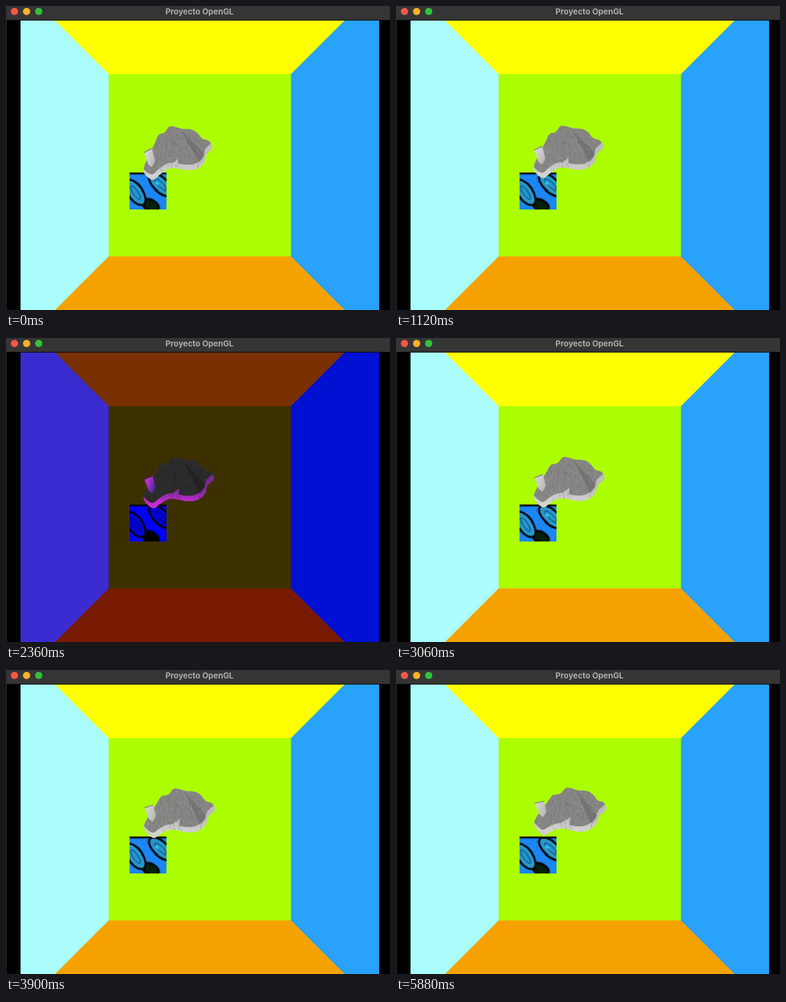
An HTML page with a canvas that plays this animation: 634x502 px, repeating every 5.9 s.

```html
<!DOCTYPE html>
<html lang="es">
<head>
<meta charset="utf-8">
<title>Proyecto OpenGL</title>
<style>
html, body { margin: 0; width: 634px; height: 502px; overflow: hidden; background: #000; }
canvas { display: block; }
</style>
</head>
<body>
<canvas id="stage" width="634" height="502"></canvas>
<script>
const LOOP = 5900, DARK_FROM = 1200, DARK_TO = 2820;
const ctx = document.getElementById('stage').getContext('2d');

const bright = {
  left: '#aafdfb', top: '#ffff00', back: '#acff00', right: '#28a2fa', floor: '#f5a200',
  fur: '#858583', grain: ['#4c4c4c', '#b4b4b2'], shade: 'rgba(40,40,40,0.2)',
  pale: ['#bebebc', '#d2d2d0'], ear: ['#d4d4d2', '#b8b8b6'],
  sky: '#1c86f4', leaf: '#2898cc', vein: '#104f88', glow: '#2fd5e0', moss: '#04210c'
};
const dark = {
  left: '#3a2cd0', top: '#783000', back: '#3c3000', right: '#0010d2', floor: '#781a00',
  fur: '#2b2b2b', grain: ['#101010', '#444444'], shade: 'rgba(0,0,0,0.2)',
  pale: ['#7a2a9c', '#c62cd4'], ear: ['#c82cd8', '#402c90'],
  sky: '#0000ff', leaf: '#0000dc', vein: '#000070', glow: '#0000f0', moss: '#000000'
};

// Key points of the model at the start of the loop
const BODY = [
  [238,243], [246,226], [252,213], [262,209], [270,199], [280,200], [291,203],
  [305,204], [316,210], [324,219], [335,223], [341,234], [331,245], [327,259],
  [315,269], [298,271], [272,268], [256,277], [242,287], [227,272]
];
const EAR = [[228,242], [241,235], [246,255], [241,266], [235,262]];
const NOTCH = [[268,266], [284,252], [284,268]];
const RIDGE = [[288,204], [328,245], [320,260]];

const clamp = v => Math.max(0, Math.min(1, v));

// The model tilts towards the viewer: its top leans right, its low left side rises
function tilt(points, k, lift = 0) {
  return points.map(([x, y]) => {
    const high = clamp((275 - y) / 75) * clamp((x - 225) / 40);
    const near = clamp((280 - x) / 50) * clamp((y - 200) / 60);
    return [x + k * (1 + 10 * high), y - k * (4 + 14 * near + lift)];
  });
}

function random(seed) {
  return () => (seed = (seed * 16807) % 2147483647) / 2147483647;
}

function polygon(points) {
  const path = new Path2D();
  points.forEach(p => path.lineTo(...p));
  path.closePath();
  return path;
}

function smooth(points) {
  const path = new Path2D(), n = points.length;
  path.moveTo(...points[0]);
  for (let i = 0; i < n; i++) {
    const [a, b, c, d] = [n - 1, 0, 1, 2].map(j => points[(i + j) % n]);
    path.bezierCurveTo(b[0] + (c[0] - a[0]) / 6, b[1] + (c[1] - a[1]) / 6,
      c[0] - (d[0] - b[0]) / 6, c[1] - (d[1] - b[1]) / 6, c[0], c[1]);
  }
  path.closePath();
  return path;
}

function fill(path, style) {
  ctx.fillStyle = style;
  ctx.fill(path);
}

function box(style, x, y, w, h) {
  ctx.fillStyle = style;
  ctx.fillRect(x, y, w, h);
}

function ramp(x0, y0, x1, y1, [from, to]) {
  const g = ctx.createLinearGradient(x0, y0, x1, y1);
  g.addColorStop(0, from);
  g.addColorStop(1, to);
  return g;
}

function makeTile(c) {
  const tile = document.createElement('canvas');
  tile.width = tile.height = 30;
  const g = tile.getContext('2d');
  g.scale(30 / 61, 30 / 61);
  const oval = (x, y, rx, ry, turn, color, line = '#000', width = 3.5) => {
    g.beginPath();
    g.ellipse(x, y, rx, ry, turn, 0, 7);
    g.fillStyle = color;
    g.fill();
    g.strokeStyle = line;
    g.lineWidth = width;
    g.stroke();
  };
  g.fillStyle = c.sky;
  g.fillRect(0, 0, 61, 61);
  oval(35, 54, 14, 9, 0.5, c.moss);
  for (const [x, y, turn] of [[10, 33, 0.95], [51, 20, 0.75]]) {
    oval(x, y, 24, 12, turn, c.leaf);
    oval(x, y, 13, 4, turn, c.leaf, c.vein, 2);
  }
  oval(45, 18, 3, 1.5, 0.7, c.glow, c.glow, 1);
  g.fillStyle = '#000';
  g.fillRect(0, 0, 61, 3);
  return tile;
}
bright.tile = makeTile(bright);
dark.tile = makeTile(dark);

function drawRoom(c) {
  box('#000', 0, 0, 634, 502);
  box(c.left, 24, 24, 296, 478);
  box(c.right, 320, 24, 296, 478);
  const slope = (y, inner) => polygon([[81, y], [559, y], [470, inner], [170, inner]]);
  fill(slope(24, 113), c.top);
  fill(slope(502, 413), c.floor);
  box(c.back, 169.5, 112.5, 301, 301);
  ctx.imageSmoothingEnabled = false;
  ctx.drawImage(c.tile, 204, 275, 61, 61);
}

function drawBar() {
  box('#353535', 0, 0, 634, 23);
  box('#353535', 0, 23, 1, 479);
  ['#f95548', '#fbb124', '#32c238'].forEach((color, i) => {
    ctx.beginPath();
    ctx.arc(14 + 20 * i, 9, 6, 0, 7);
    ctx.fillStyle = color;
    ctx.fill();
  });
  ctx.font = '700 13.2px Inter, "Open Sans", sans-serif';
  ctx.textAlign = 'center';
  ctx.fillStyle = '#acacac';
  ctx.fillText('Proyecto OpenGL', 319.5, 13.5);
}

function drawGrain(c, k) {
  const rnd = random(77);
  ctx.lineWidth = 0.8;
  for (let i = 0; i < 700; i++) {
    const x = 222 + 126 * rnd() + 6 * k, y = 192 + 98 * rnd() - 7 * k;
    ctx.strokeStyle = c.grain[i % 2];
    ctx.globalAlpha = 0.4 * rnd();
    ctx.beginPath();
    ctx.moveTo(x, y);
    ctx.lineTo(x + 1, y + 3 + 4 * rnd());
    ctx.stroke();
  }
  ctx.globalAlpha = 1;
}

function drawModel(c, k) {
  const points = tilt(BODY, k), body = smooth(points);
  const belly = ramp(0, 254 - 8 * k, 0, 276 - 12 * k, c.pale);
  fill(body, belly);
  ctx.save();
  ctx.clip(body);
  // The fur ends a little above the lower rim, which leaves the pale belly
  fill(smooth(points.map(([x, y]) => [x - 2, y - 9])), c.fur);
  box(c.fur, 250, 190, 70, 52);
  fill(polygon(tilt(RIDGE, k)), c.shade);
  fill(polygon(tilt(NOTCH, k, 5)), belly);
  drawGrain(c, k);
  ctx.restore();

  const ear = tilt(EAR, k, 8);
  const y = ear[0][1];
  fill(polygon(ear), ramp(230, y + 8, 247, y + 14, c.ear));
  ctx.strokeStyle = c.fur;
  ctx.lineWidth = 1.5;
  ctx.beginPath();
  ctx.moveTo(...ear[0]);
  ctx.lineTo(...ear[1]);
  ctx.stroke();
}

function frame(now) {
  const t = now % LOOP;
  const colors = t >= DARK_FROM && t < DARK_TO ? dark : bright;
  drawRoom(colors);
  drawModel(colors, t / LOOP);
  drawBar();
  requestAnimationFrame(frame);
}
frame(0);
</script>
</body>
</html>
```
